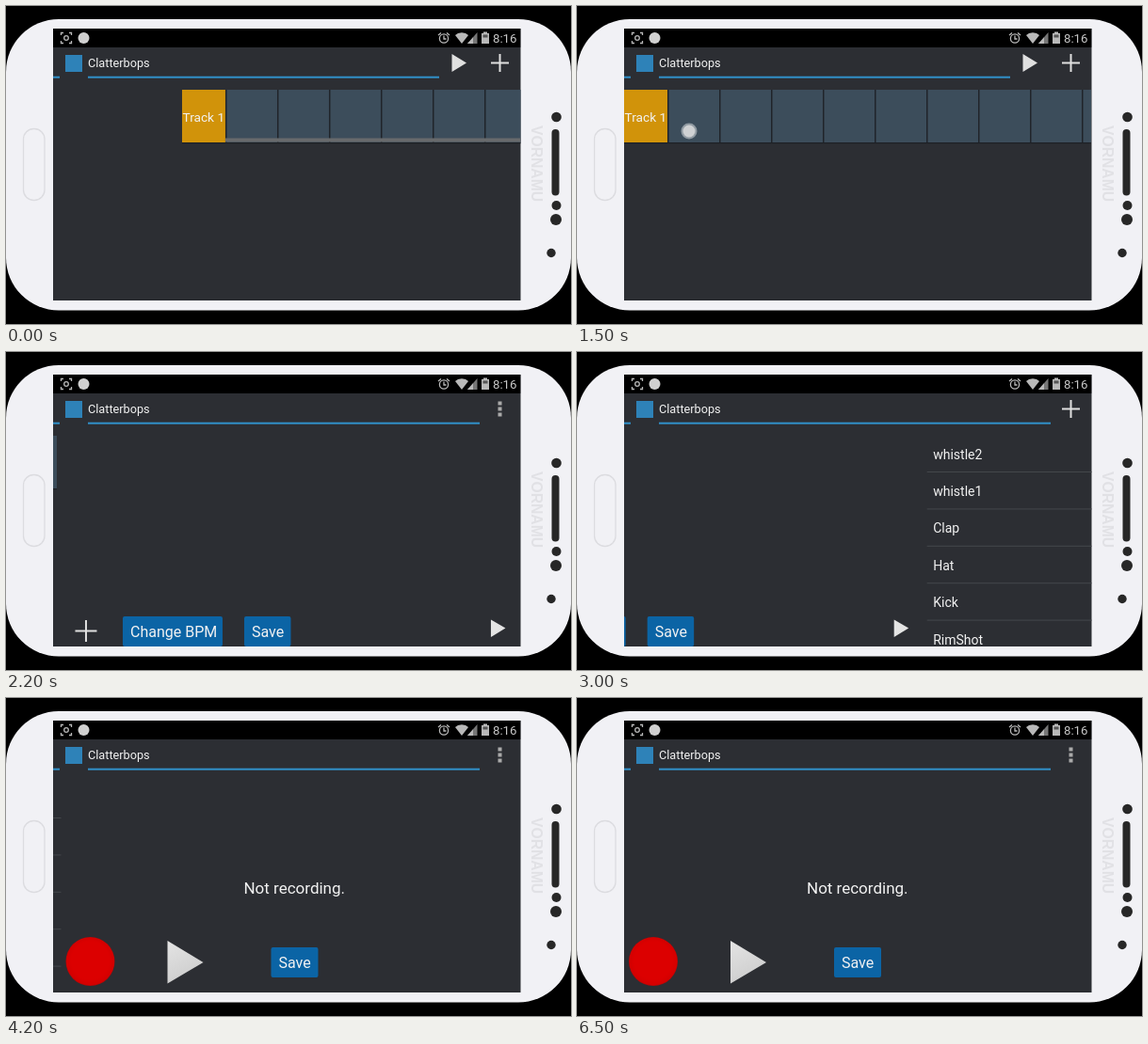
Recreate the animation shown at these times as an HTML page with a canvas. Size 600x338 px, loop 6600 ms.

```html
<!DOCTYPE html>
<html lang="en">
<head>
<meta charset="utf-8">
<title>Clatterbops</title>
<style>
html, body { margin: 0; height: 100%; overflow: hidden; background: #000; }
canvas { display: block; width: 100vw; height: 100vh; }
</style>
</head>
<body>
<canvas id="stage" width="600" height="338"></canvas>
<script>
const g = document.getElementById('stage').getContext('2d');
const LOOP = 6600, STEP = 100, GLIDE = 625;
const LEFT = 50, PAGE = 496;
const SWIPES = [-218, 1700, 2916, 3736]; // start time of each glide to the next page
const SOUNDS = ['whistle2', 'whistle1', 'Clap', 'Hat', 'Kick', 'RimShot'];

function rect(x, y, w, h, color) {
  g.fillStyle = color;
  g.fillRect(x, y, w, h);
}

function round(x, y, w, h, r, color) {
  g.fillStyle = color;
  g.beginPath();
  g.roundRect(x, y, w, h, r);
  g.fill();
}

function disc(x, y, r, color) {
  g.fillStyle = color;
  g.beginPath();
  g.arc(x, y, r, 0, 7);
  g.fill();
}

function poly(color, ...pts) {
  g.fillStyle = color;
  g.beginPath();
  for (let i = 0; i < pts.length; i += 2) g.lineTo(pts[i], pts[i + 1]);
  g.fill();
}

function text(str, x, y, size, color = '#f2f2f2') {
  g.font = `${size}px Roboto, sans-serif`;
  g.fillStyle = color;
  g.fillText(str, x, y);
}

function plus(x, y, r) {
  rect(x - r, y - 1, 2 * r, 2, '#e0e0e0');
  rect(x - 1, y - r, 2, 2 * r, '#e0e0e0');
}

function button(label, x, y, w) {
  round(x, y, w, 32, 2, '#0b64a5');
  text(label, x + 8, y + 22, 16);
}

function phone() {
  rect(0, 0, 600, 338, '#000');
  round(0, 14, 600, 309.5, 56, '#f1f1f5');
  g.strokeStyle = '#dcdce0';
  g.lineWidth = 1.3;
  g.beginPath();
  g.roundRect(18.5, 130.5, 22.5, 76, 11);
  g.stroke();
  const ink = '#272727';
  disc(584.5, 118, 5.3, ink);
  round(579.5, 131, 8, 70.5, 4, ink);
  disc(584.5, 212, 5, ink);
  disc(584, 227, 6, ink);
  disc(579, 262.5, 4.7, ink);
  g.save();
  g.translate(558, 127);
  g.rotate(Math.PI / 2);
  g.font = 'bold 15.7px "Liberation Sans", Arial, sans-serif';
  g.fillStyle = '#e1e1e5';
  g.fillText('VORNAMU', 0, 0);
  g.restore();
}

function statusBar() {
  const gray = '#b9b9b9';
  rect(LEFT, 24, 496.5, 20, '#000');
  g.strokeStyle = gray;
  g.lineWidth = 1.3;
  for (const sx of [-1, 1]) for (const sy of [-1, 1]) {
    g.beginPath();
    g.moveTo(64 + sx * 3, 34 + sy * 5.5);
    g.lineTo(64 + sx * 5.5, 34 + sy * 5.5);
    g.lineTo(64 + sx * 5.5, 34 + sy * 3);
    g.stroke();
  }
  g.beginPath();
  g.arc(64, 34, 2.3, 0, 7);
  g.stroke();
  disc(82.5, 34, 6, '#d0d0d0');

  // alarm clock
  g.beginPath();
  g.arc(465, 34.5, 4.6, 0, 7);
  g.moveTo(465, 31.5);
  g.lineTo(465, 35);
  g.lineTo(467.5, 35);
  g.moveTo(459, 31);
  g.lineTo(462, 28.5);
  g.moveTo(468, 28.5);
  g.lineTo(471, 31);
  g.stroke();

  // wifi, signal, battery
  poly(gray, 477, 31, 480, 29, 484, 28.2, 488, 29, 491, 31, 484, 40);
  poly('#777', 490, 40, 500.5, 40, 500.5, 28);
  poly(gray, 490, 40, 496, 40, 496, 33.2);
  rect(507, 27.5, 4, 2, gray);
  rect(505, 29, 8, 11, gray);
  rect(506.5, 30.5, 5, 3, '#555');
  text('8:16', 517, 38.7, 13.2, '#c8c8c8');
}

function titleBar(page) {
  const blue = '#3090c9';
  rect(63, 52, 18, 18, '#2e82b8');
  text('Clatterbops', 87, 65, 12.7);
  rect(LEFT, 74.7, 7, 2, blue);
  rect(87, 74.7, page === 1 ? 373 : 416, 2, blue);
  if (page === 1) poly('#e0e0e0', 473.5, 51, 473.5, 70, 489, 60.5);
  if (page === 1 || page === 3) plus(524.5, 60.5, 9.5);
  else for (let i = 0; i < 3; i++) rect(522.5, 52.5 + i * 6, 4, 4, '#aaa');
}

function tracks(t) {
  rect(0, 89, PAGE, 56, '#3c4d5b');
  rect(0, 89, 46, 56, '#d1930a');
  for (let x = 46; x < PAGE; x += 55) rect(x, 89, 1.5, 56, '#20242a');
  rect(0, 145, PAGE, 1.2, '#1d2025');
  text('Track 1', 0.5, 123, 13.7);
  g.globalAlpha = Math.max(0, 1 - t / 600);
  rect(46, 140.5, PAGE - 46, 4, '#686a6c');
  g.globalAlpha = 1;
}

function mixer() {
  plus(31, 296.5, 11.5);
  button('Change BPM', 70, 281, 106);
  button('Save', 199, 281, 49.5);
  poly('#e4e4e4', 461, 284.5, 461, 303, 476.5, 293.5);
}

function sounds() {
  SOUNDS.forEach((name, i) => {
    const y = 113.5 + i * 39.4;
    text(name, 6.5, y, 14);
    rect(0, y + 13.5, PAGE, 1, '#44474b');
  });
}

function recorder() {
  text('Not recording.', 194, 207.5, 17);
  const red = g.createRadialGradient(31, 279, 20, 31, 280, 26.5);
  red.addColorStop(0, '#dc0000');
  red.addColorStop(0.75, '#d40000');
  red.addColorStop(1, '#a30808');
  disc(31, 280, 26, red);
  const shade = g.createLinearGradient(113, 258, 135, 303);
  shade.addColorStop(0, '#e4e4e4');
  shade.addColorStop(1, '#cccccc');
  poly(shade, 113, 258, 113, 303.5, 151, 281);
  button('Save', 223, 265, 50);
}

const PAGES = [null, tracks, mixer, sounds, recorder];

function draw(t) {
  let page = 0, scroll = 0;
  for (const start of SWIPES) {
    if (t < start) break;
    page++;
    scroll += 1 - (1 - Math.min(1, (t - start) / GLIDE)) ** 3;
  }
  phone();
  g.save();
  g.beginPath();
  g.rect(LEFT, 24, 496.5, 289);
  g.clip();
  rect(LEFT, 24, 497, 289, '#2c2e33');
  PAGES.forEach((paint, i) => {
    if (!paint || Math.abs(i - scroll) >= 1) return;
    g.save();
    g.translate(LEFT + (i - scroll) * PAGE, 0);
    paint(t);
    g.restore();
  });
  statusBar();
  titleBar(page);
  if (t >= 1400 && t < 1700) {
    disc(119, 133, 8.5, 'rgba(190,195,200,.65)');
    disc(119, 133, 6.5, '#cfd1d3');
  }
  g.restore();
}

function tick() {
  draw(Math.floor(performance.now() % LOOP / STEP) * STEP);
  requestAnimationFrame(tick);
}
tick();
</script>
</body>
</html>
```
